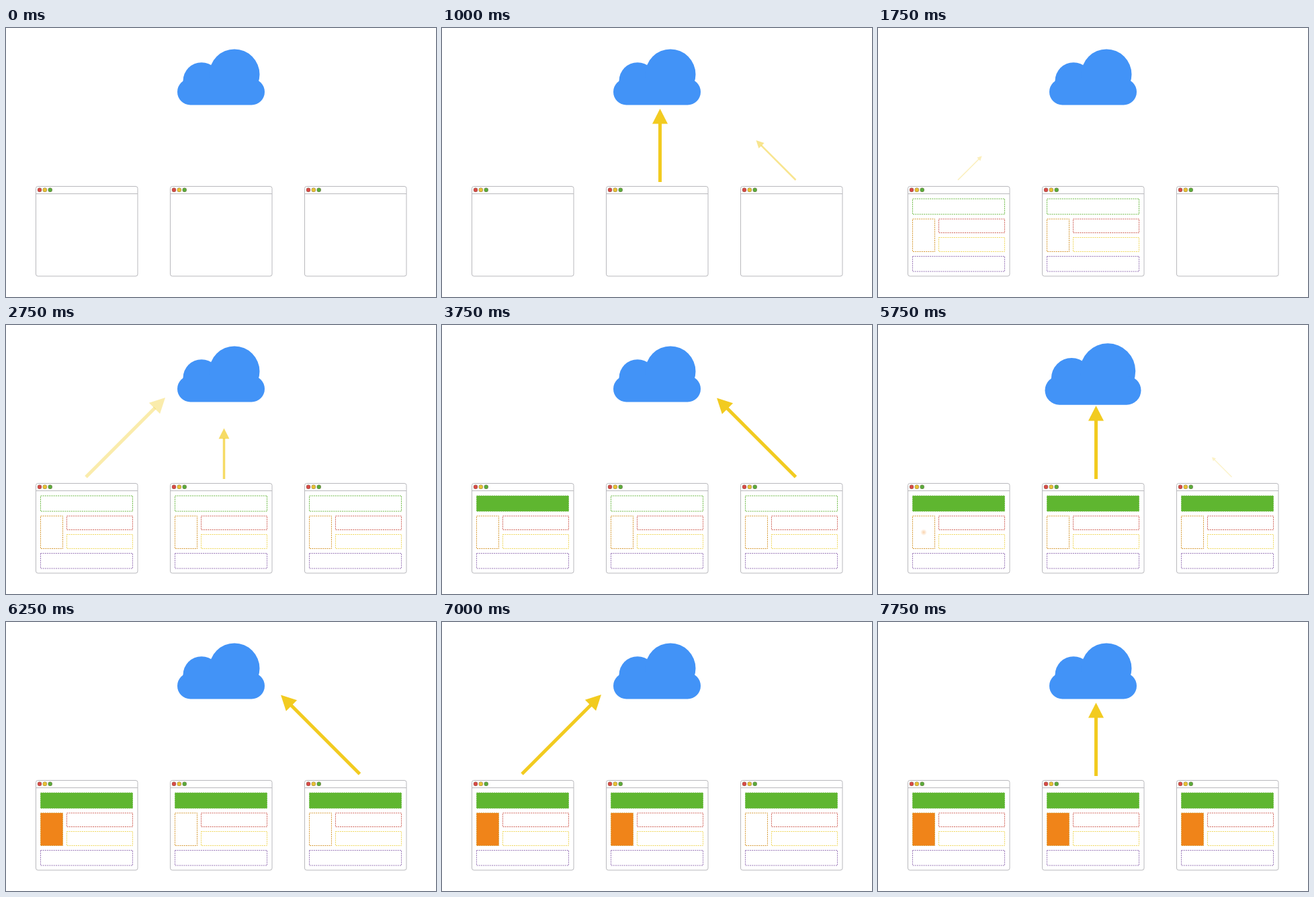
Recreate the animation shown at these times as an HTML page with a canvas. Size 640x400 px, loop 8000 ms.

```html
<!DOCTYPE html>
<html>
<head>
<meta charset="utf-8">
<style>
  html, body { margin: 0; overflow: hidden; background: #fff; }
  canvas { display: block; }
</style>
</head>
<body>
<canvas id="stage" width="640" height="400"></canvas>
<script>
const ctx = document.getElementById('stage').getContext('2d');
const LOOP = 8000, FIRST_STEP = 1600, STEP = 805, STEPS = 8;
const OFFSETS = [0, 200, 400];
const LIGHTS = [[50, '#d84a48'], [57.8, '#e8c134'], [65.7, '#5aab3c']];

// x, y, width, height, outline
const SLOTS = [
  [51.5, 254, 137, 23, '#6cb944'],
  [51.5, 284, 33, 48.5, '#d69a35'],
  [90.5, 284, 98, 20.5, '#d0645a'],
  [90.5, 311.5, 98, 21, '#efd75c'],
  [51.5, 339.5, 137, 22.5, '#9876b6']
];
const FILLS = ['#5fb630', '#f08419'];

// base x, base y, tip x, tip y
const ARROWS = [[119, 226, 237, 108], [324.5, 229, 324.5, 120], [526.5, 226, 409, 108.5]];

const stepTime = k => FIRST_STEP + k * STEP;
const outlineTimes = [1260, 1500, 1800];

// One quick opening round, then one request per step.
const requests = [60, 400, 750].map((start, i) => ({ start, target: i, hold: 600 }));
for (let k = 0; k < STEPS; k++) requests.push({ start: stepTime(k), target: k % 3, hold: 1000 });

const clamp = v => Math.max(0, Math.min(1, v));
const smooth = v => v * v * (3 - 2 * v);

function disc(x, y, r, color) {
  ctx.fillStyle = color;
  ctx.beginPath();
  ctx.arc(x, y, r, 0, 7);
  ctx.fill();
}

function drawCloud(t) {
  let pulse = 0;
  for (let k = 1; k < STEPS; k++) {
    const d = Math.abs(t - stepTime(k) - 130);
    if (d < 180) pulse = Math.cos(Math.PI * d / 360) ** 2;
  }
  const scale = 1 + 0.1 * pulse, blue = '#4293f7';
  ctx.save();
  ctx.translate(320, 73);
  ctx.scale(scale, scale);
  ctx.translate(-320, -73);
  disc(291, 78.7, 27.5, blue);
  disc(340, 69, 37.5, blue);
  ctx.beginPath();
  ctx.roundRect(255, 75.5, 130, 39, 19.5);
  ctx.fill();
  ctx.restore();
}

function drawArrow([x0, y0, x1, y1], scale, alpha) {
  const length = Math.hypot(x1 - x0, y1 - y0), neck = length - 22.6;
  ctx.save();
  ctx.globalAlpha = alpha;
  ctx.translate(x0, y0);
  ctx.rotate(Math.atan2(y1 - y0, x1 - x0));
  ctx.scale(scale, scale);
  ctx.fillStyle = '#f2cb20';
  ctx.fillRect(0, -2.5, neck + 1, 5);
  ctx.beginPath();
  ctx.moveTo(length, 0);
  ctx.lineTo(neck, -11.5);
  ctx.lineTo(neck, 11.5);
  ctx.fill();
  ctx.restore();
}

// Soft circular reveal from the middle of a slot.
function fillSlot([x, y, w, h], color, progress) {
  if (progress <= 0) return;
  const soft = 8, cx = x + w / 2, cy = y + h / 2;
  const radius = smooth(progress) * (Math.hypot(w, h) / 2 + soft);
  const gradient = ctx.createRadialGradient(cx, cy, Math.max(0, radius - soft), cx, cy, radius);
  gradient.addColorStop(0, color);
  gradient.addColorStop(1, color + '00');
  ctx.globalAlpha = Math.min(1, radius / soft) ** 2;
  ctx.fillStyle = progress < 1 ? gradient : color;
  ctx.fillRect(x, y, w, h);
  ctx.globalAlpha = 1;
}

function drawWindow(i, t) {
  ctx.save();
  ctx.translate(OFFSETS[i], 0);
  ctx.lineWidth = 1;
  ctx.strokeStyle = '#b9b9bd';
  ctx.beginPath();
  ctx.roundRect(44.5, 235.5, 151.5, 133.5, 3);
  ctx.moveTo(44.5, 246.5);
  ctx.lineTo(196, 246.5);
  ctx.stroke();
  for (const [x, color] of LIGHTS) {
    disc(x, 240.8, 3.2, '#8a7a60');
    disc(x, 240.8, 2.8, color);
  }
  FILLS.forEach((color, n) => fillSlot(SLOTS[n], color, clamp((t - stepTime(2 + 3 * n + i)) / 560)));
  ctx.globalAlpha = clamp((t - outlineTimes[i]) / 200);
  ctx.setLineDash([2, 1.2]);
  for (const [x, y, w, h, color] of SLOTS) {
    ctx.strokeStyle = color;
    ctx.strokeRect(x, y, w, h);
  }
  ctx.restore();
}

function draw(now) {
  const t = now % LOOP;
  ctx.fillStyle = '#fff';
  ctx.fillRect(0, 0, 640, 400);
  drawCloud(t);
  OFFSETS.forEach((_, i) => drawWindow(i, t));
  for (const { start, target, hold } of requests) {
    const age = t - start, grow = clamp(age / 500);
    if (grow > 0) drawArrow(ARROWS[target], grow, grow * (1 - clamp((age - hold) / 240)));
  }
  requestAnimationFrame(draw);
}

requestAnimationFrame(draw);
</script>
</body>
</html>
```
